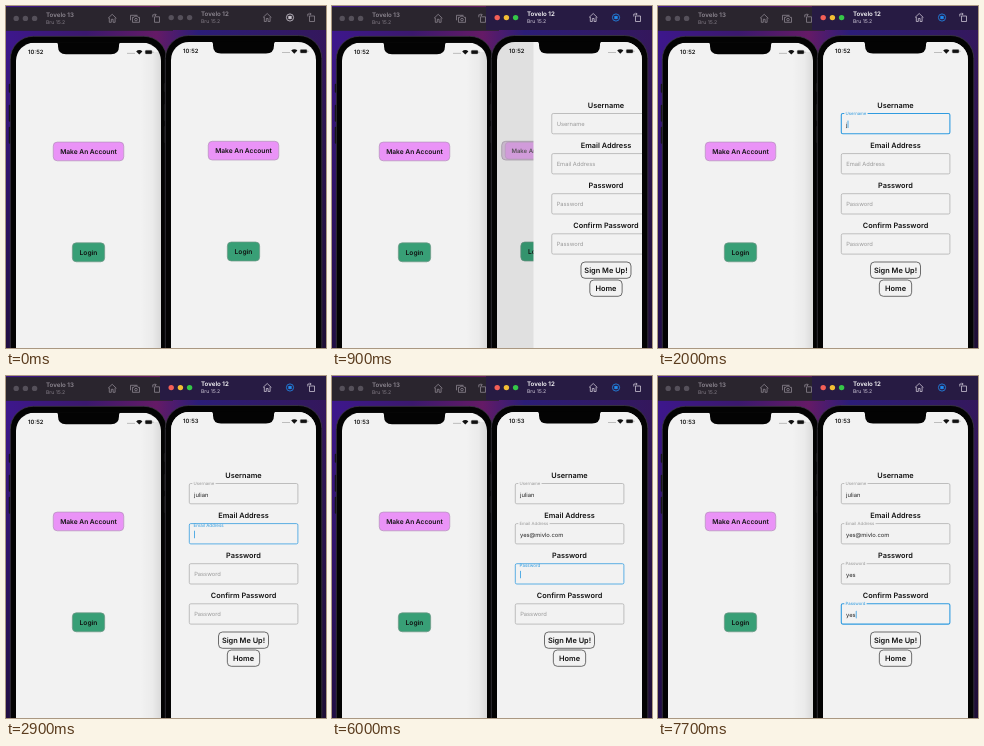
An HTML page for the animation above (8000 ms loop, 320 by 342 pixels).

```html
<!DOCTYPE html>
<html lang="en">
<head>
<meta charset="utf-8">
<style>
  html, body { margin: 0; width: 100%; height: 100%; overflow: hidden; background: #1d0f33; }
  svg { display: block; width: 100vw; height: 100vh; font-family: Inter, "Open Sans", sans-serif; text-rendering: geometricPrecision; }
</style>
</head>
<body>
<svg viewBox="0 0 320 342">
  <defs>
    <linearGradient id="desk">
      <stop offset="0" stop-color="#3d178c"/><stop offset=".25" stop-color="#3b176e"/>
      <stop offset=".47" stop-color="#651a66"/><stop offset=".6" stop-color="#2b1d78"/>
      <stop offset="1" stop-color="#34175c"/>
    </linearGradient>
    <linearGradient id="fade" x2="0" y2="1">
      <stop offset=".1" stop-color="#150a25" stop-opacity="0"/><stop offset="1" stop-color="#150a25" stop-opacity=".7"/>
    </linearGradient>
    <linearGradient id="shade">
      <stop offset="0" stop-opacity="0"/><stop offset=".6" stop-opacity=".03"/><stop offset="1" stop-opacity=".1"/>
    </linearGradient>
    <clipPath id="screen"><rect x="10" y="36" width="145" height="340" rx="18"/></clipPath>
  </defs>
  <rect width="320" height="342" fill="url(#desk)"/>
  <rect width="320" height="342" fill="url(#fade)"/>
  <g id="left" transform="translate(0 .8)"></g>
  <rect x="134" y="46" width="21" height="296" fill="url(#shade)"/>
  <g id="right" transform="translate(155 0)"></g>
</svg>
<script>
const LOOP = 8000, PAPER = '#f2f2f2', BLUE = '#2f9be0', WIDTH = 145;
const ACTIVE = 600, OPEN = 763;
const $ = id => document.getElementById(id);
const pen = document.createElement('canvas').getContext('2d');
const clamp = v => Math.max(0, Math.min(1, v));
const mix = (a, b, p) => a + (b - a) * p;

// keys: the time at which each character appears
const fields = [
  { title: 'Username', hint: 'Username', text: 'julian', focus: 1600,
    keys: [2000, 2100, 2200, 2300, 2400, 2500] },
  { title: 'Email Address', hint: 'Email Address', text: 'yes@mivlo.com', focus: 2800,
    keys: [3700, 4000, 4200, 4600, 4800, 4900, 5000, 5100, 5200, 5400, 5500, 5600, 5700] },
  { title: 'Password', hint: 'Password', text: 'yes', focus: 5900, keys: [6400, 6500, 6600] },
  { title: 'Confirm Password', hint: 'Password', text: 'yes', focus: 6900, keys: [7400, 7600, 7700] }
];

function measure(s, size) {
  pen.font = '100px Inter, "Open Sans", sans-serif';
  return pen.measureText(s).width * size / 100;
}

// y is the vertical middle of the capitals
function label(s, x, y, size, fill = '#111', weight = 400, anchor = 'start') {
  return `<text x="${x}" y="${y + size * .36}" font-size="${size}" fill="${fill}" font-weight="${weight}" text-anchor="${anchor}">${s}</text>`;
}

function box(x, y, w, h, r, fill, stroke = 'none', line = 0) {
  return `<rect x="${x}" y="${y}" width="${w}" height="${h}" rx="${r}" fill="${fill}" stroke="${stroke}" stroke-width="${line}"/>`;
}

function button(s, y, w, h, size, fill, stroke) {
  return box(82.5 - w / 2, y, w, h, 4, fill, stroke, .7) +
    label(s, 82.5, y + h / 2, size, '#111', 600, 'middle');
}

function titleBar(name, active) {
  const lights = active ? ['#f45f57', '#f2bd35', '#35c648'] : ['#55505a', '#55505a', '#55505a'];
  return box(-1, .3, 168, 23.7, 0, active ? '#271b43' : '#2a252e') +
    lights.map((c, i) => `<circle cx="${10.2 + i * 9.2}" cy="11.6" r="2.7" fill="${c}"/>`).join('') +
    label(name, 40, 8.2, 6.2, active ? '#fff' : '#8f8993', 600) +
    label('Bru 15.2', 40, 15, 5.1, active ? '#d0cad9' : '#837d87');
}

function icons(active, recorder) {
  const ink = active ? '#c9c3d2' : '#8b858f';
  const ring = active ? '#218cf0' : '#cfcad3';
  const middle = recorder
    ? `<g stroke="${ring}"><circle cx="129" cy="11.5" r="3.6"/><rect x="127.8" y="10.3" width="2.4" height="2.4" fill="${ring}"/></g>`
    : '<path d="M124.5 13.5v-5h7M126.5 10.5h1.5l1-1.2h2l1 1.2h1.5v5h-7z"/><circle cx="130" cy="12.8" r="1.3"/>';
  return `<g fill="none" stroke="${ink}" stroke-width=".8">
    <path d="M102 11.5l4.2-4 4.2 4M103.3 11v4.5h2v-3h1.8v3h2V11"/>${middle}
    <path d="M148.5 10h5v5.5h-5zM146.8 10.5V8h3.2M149 6.8L150.2 8 149 9.2"/></g>`;
}

function phone(clock, content) {
  return box(2.8, 77, 2, 9, 1, '#111') + box(2.8, 98, 2, 17, 1, '#111') + box(2.8, 120, 2, 17, 1, '#111') +
    box(4.3, 29.5, 156.5, 360, 23, '#030303', '#3d3943', .8) +
    `<g clip-path="url(#screen)">${box(10, 36, WIDTH, 340, 0, PAPER)}${content}</g>
    <path d="M49 35.5q3 0 3 3v1q0 8 8 8h45q8 0 8-8v-1q0-3 3-3z" fill="#030303"/>` +
    label(clock, 22, 45.3, 5.85, '#111', 600) +
    [122, 124, 126, 128].map(x => `<circle cx="${x}" cy="46.5" r=".55" fill="#777"/>`).join('') +
    `<path d="M133.3 47.8l-3.1-3.2a4.4 4.4 0 0 1 6.2 0z" fill="#111"/>` +
    box(139.2, 43.5, 6.8, 3.6, 1, '#111', '#888', .4) + box(146.6, 44.6, .7, 1.5, .3, '#888');
}

function home(pressed) {
  const make = button('Make An Account', 135.3, 70.5, 18.7, 6.65, '#ea93f7', '#b292b9');
  const squeezed = box(47.25, 135.3, 70.5, 18.7, 4, '#d8c6dc', '#a9a0ac', .7) +
    `<g transform="translate(82.5 144.6) scale(.9) translate(-82.5 -144.6)" opacity=".6">${make}</g>`;
  return (pressed ? squeezed : make) +
    button('Login', 236, 32.3, 19, 6.65, '#389f76', '#6f9686');
}

function field(f, i, t) {
  const top = 107.5 + i * 40.1;
  const next = fields[i + 1];
  const on = t >= f.focus && !(next && t >= next.focus);
  const age = t - f.focus;
  const up = 1 - (1 - clamp(age / 160)) ** 2;
  const size = mix(5.75, 4.3, up);
  const typed = f.text.slice(0, f.keys.filter(k => t >= k).length);
  let out = label(f.title, 82.5, top - 8, 7.35, '#111', 600, 'middle') +
    box(28.3, top, 108.6, 20.3, 1.5, PAPER, on ? BLUE : '#a8a8a8', on ? mix(.6, 1.1, clamp(age / 300)) : .7);
  if (up === 1) out += box(31.3, top - 1, measure(f.hint, size) + 2.4, 2, 0, PAPER);
  out += label(f.hint, mix(33.2, 32.5, up), mix(top + 10.4, top, up), size, on ? BLUE : '#999');
  out += label(typed, 33, top + 11, 5.8, '#222');
  const last = typed ? f.keys[typed.length - 1] : f.focus;
  if (on && (t - last) % 850 < 550)
    out += box(33.2 + measure(typed, 5.8), top + 7, .8, 7.6, .3, BLUE);
  return out;
}

function form(t) {
  return box(10, 36, WIDTH, 340, 0, PAPER) + fields.map((f, i) => field(f, i, t)).join('') +
    button('Sign Me Up!', 256, 50, 16.3, 7.4, PAPER, '#333') +
    button('Home', 274, 32.3, 16.3, 7.4, PAPER, '#333');
}

function rightScreen(t) {
  if (t < OPEN) return home(t >= ACTIVE);
  const rest = t > 1350 ? 0 : Math.exp(-(t - OPEN) / 100);
  return `<g transform="translate(${-.3 * WIDTH * (1 - rest)} 0)">${home(true)}</g>` +
    `<rect x="10" y="36" width="${WIDTH}" height="340" opacity="${.1 * (1 - rest)}"/>` +
    `<g transform="translate(${WIDTH * rest} 0)">${form(t)}</g>`;
}

const cache = {};
function put(id, html) {
  if (cache[id] !== html) $(id).innerHTML = cache[id] = html;
}

function draw(now) {
  const t = now % LOOP, active = t >= ACTIVE;
  put('left', titleBar('Tovelo 13', false) + icons(false, false) +
    phone(t < 3000 ? '10:52' : '10:53', home(false)));
  put('right', titleBar('Tovelo 12', active) + icons(active, true) +
    phone(t < 2600 ? '10:52' : '10:53', rightScreen(t)));
  requestAnimationFrame(draw);
}
draw(0);
</script>
</body>
</html>
```
